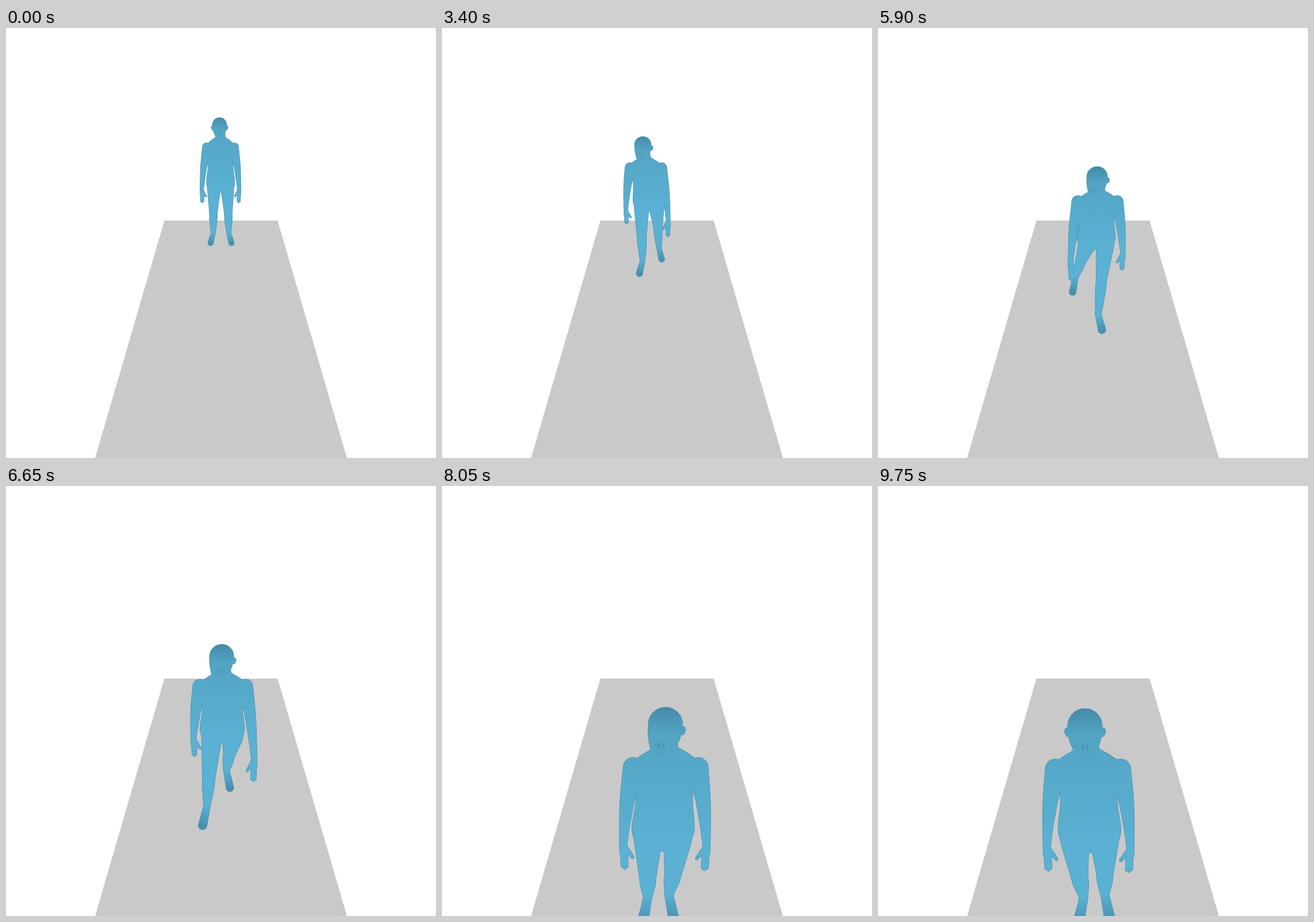
These frames come from a looping animation (748x748 px, 9.8 s). An HTML page with a canvas:

```html
<!DOCTYPE html>
<html lang="en">
<head>
<meta charset="utf-8">
<title>Walking figure</title>
<style>
  html, body { margin: 0; width: 100%; height: 100%; overflow: hidden; background: #fff; }
  svg, canvas { position: absolute; left: 0; top: 0; width: 748px; height: 748px; display: block; }
</style>
</head>
<body>
<svg viewBox="0 0 748 748"><polygon points="275.5,335 472.5,335 593,748 155,748" fill="#c9c9c9"/></svg>
<canvas id="stage" width="748" height="748"></canvas>
<script>
const ctx = document.getElementById('stage').getContext('2d');
const LOOP = 9800, STEP = 50;

// Camera: lengths in metres, pitched down 30 degrees.
const FOCAL = 648, EYE = 2.62, START = 4.58, TILT = Math.PI / 6;
const COS = Math.cos(TILT), SIN = Math.sin(TILT);

// x to the right, h above the floor, f walked towards the camera
function project([x, h, f], r = 0) {
  const d = START - f, z = d * COS + (EYE - h) * SIN, s = FOCAL / z;
  return [374 + x * s, 374 + ((EYE - h) * COS - d * SIN) * s, r * s];
}

const clamp = k => Math.min(1, Math.max(0, k));
const smooth = k => { k = clamp(k); return k * k * (3 - 2 * k); };
const mix = (a, b, k) => a + (b - a) * k;
const mixPt = (a, b, k) => a.map((v, i) => mix(v, b[i], k));
const add = (p, x, h, f) => [p[0] + x, p[1] + h, p[2] + f];

// Monotone curve through [time, value] knots.
function curve(...knots) {
  const slope = i => (knots[i + 1][1] - knots[i][1]) / (knots[i + 1][0] - knots[i][0]);
  const tangent = i => {
    if (i === 0 || i === knots.length - 1) return 0;
    const a = slope(i - 1), b = slope(i);
    return a * b > 0 ? 2 * a * b / (a + b) : 0;
  };
  return t => {
    if (t <= knots[0][0]) return knots[0][1];
    const i = knots.findIndex((k, n) => n < knots.length - 1 && t < knots[n + 1][0]);
    if (i < 0) return knots[knots.length - 1][1];
    const [t0, a] = knots[i], [t1, b] = knots[i + 1], h = t1 - t0, s = (t - t0) / h;
    return mix(a, b, smooth(s)) + h * s * (1 - s) * (tangent(i) * (1 - s) - tangent(i + 1) * s);
  };
}

// Pelvis travel, sideways sway, forward lean and head turn.
const travel = curve([2200, 0], [3000, 0.48], [5050, 1.04], [5900, 1.46], [7300, 2.55], [8150, 3.08]);
const sway = curve([0, -0.005], [2200, -0.05], [4300, -0.11], [6200, 0.04], [7200, -0.03], [8050, 0.035], [9100, -0.02]);
const lean = t => 0.38 * Math.sin(Math.PI * clamp((t - 2100) / 5600));
const turn = t => smooth((t - 1200) / 1000) * (1 - smooth((t - 8050) / 1050));

// Steps alternate, right of the stage first: [lift time, duration].
const steps = [[2450, 500], [3000, 600], [4250, 900], [5750, 1150], [6950, 500], [7500, 550]];

function footAt(side, t) {
  let f = 0, x = side * 0.11, swing = 0;
  steps.forEach(([lift, span], k) => {
    if ((k % 2 ? -1 : 1) !== side || t < lift) return;
    const p = clamp((t - lift) / span);
    f = mix(f, Math.min(0.42 + 0.65 * k, 3.04), smooth(p));
    x = mix(x, side * 0.1 + sway(lift + span), smooth(p));
    swing = Math.sin(Math.PI * p);
  });
  return { f, x, swing };
}

// Hips and everything above, tipped around the pelvis.
function upper(t, x, h, f = 0) {
  const a = lean(t), up = h - 0.85;
  return [x + sway(t) * (1 + 0.6 * up),
    0.85 + up * Math.cos(a) - f * Math.sin(a),
    travel(t) + up * Math.sin(a) + f * Math.cos(a)];
}

const spline = (a, b, c, d, k) => b + 0.5 * k * (c - a + k * (2 * a - 5 * b + 4 * c - d + k * (3 * (b - c) + d - a)));

// Calls fn with points on a smooth line through rows.
function along(rows, count, fn) {
  for (let i = 0; i < rows.length - 1; i++) {
    const b = rows[i], c = rows[i + 1], a = rows[i - 1] || b, d = rows[i + 2] || c;
    const n = count(b, c);
    for (let j = 0; j <= n; j++) fn(b.map((v, q) => spline(a[q], v, c[q], d[q], j / n)));
  }
}

function oval(path, x, y, rx, ry) {
  path.moveTo(x + rx, y);
  path.ellipse(x, y, rx, ry, 0, 0, 2 * Math.PI);
}

// Soft tube through [point, radius] pairs.
function tube(path, ...balls) {
  const rows = balls.map(([p, r]) => project(p, r));
  const count = (b, c) => Math.ceil(Math.hypot(c[0] - b[0], c[1] - b[1]) / 1.2) + 1;
  along(rows, count, ([x, y, r]) => oval(path, x, y, Math.max(r, 0.4), Math.max(r, 0.4)));
}

// Torso cross-sections: height, half width, half depth.
const slices = [[1.46, 0.06, 0.05], [1.405, 0.135, 0.07], [1.35, 0.175, 0.09], [1.24, 0.156, 0.1],
  [1.09, 0.158, 0.105], [0.89, 0.182, 0.11], [0.78, 0.165, 0.08]];

function torso(path, t) {
  along(slices, () => 30, ([h, w, depth]) => {
    const [x, y, s] = project(upper(t, 0, h), 1);
    const view = TILT + Math.atan((y - 374) / FOCAL);
    oval(path, x, y, w * s, depth * s * Math.sin(view));
  });
}

function leg(path, foot, side, t) {
  const { f, x, swing } = footAt(side, t);
  const heel = 0.3 * Math.max(0, travel(t) - f - 0.15);
  const hip = [sway(t) + side * 0.088, 0.8, travel(t)];
  const ankle = [x, 0.11 + heel + 0.06 * swing, f - 0.04 + heel / 2];
  const toe = [x + side * 0.035, 0.035 + 0.04 * swing, f + 0.1];

  // two-bone knee, bending forwards
  const thigh = 0.325, shin = 0.375, dh = ankle[1] - hip[1], df = ankle[2] - hip[2];
  const d = Math.hypot(dh, df);
  const reach = d < thigh + shin ? (thigh ** 2 - shin ** 2 + d * d) / (2 * d) : d * thigh / (thigh + shin);
  const bend = Math.sqrt(Math.max(0, thigh ** 2 - reach ** 2));
  const knee = [mix(hip[0], ankle[0], 0.5), hip[1] + (dh * reach + df * bend) / d, hip[2] + (df * reach - dh * bend) / d];

  tube(path, [hip, 0.084], [knee, 0.054], [mixPt(knee, ankle, 0.35), 0.05], [ankle, 0.029]);
  tube(foot, [ankle, 0.029], [toe, 0.037]);
  path.addPath(foot);
  return [project(ankle), project(toe)];
}

function arm(path, side, t) {
  const swing = 0.2 * (footAt(-side, t + 200).f - footAt(side, t + 200).f);
  const shoulder = upper(t, side * 0.17, 1.345);
  const elbow = add(shoulder, side * 0.043, -0.255, swing * 0.4);
  const wrist = add(shoulder, side * 0.07, -0.51, 0.05 + swing);
  const tip = add(wrist, -side * 0.002, -0.19, 0.04 + swing * 0.2);
  const palm = mixPt(wrist, tip, 0.4), thumb = mixPt(wrist, tip, 0.6);

  tube(path, [shoulder, 0.052], [elbow, 0.039], [wrist, 0.023], [palm, 0.025]);
  for (const k of [-1, 0, 1])
    tube(path, [add(palm, k * 0.011, 0, 0), 0.011], [add(tip, k * 0.014, k ? 0.015 : 0, 0), 0.007]);
  tube(path, [mixPt(wrist, tip, 0.15), 0.015], [add(thumb, -side * 0.05, 0, 0), 0.008]);
}

function fade(a, b, from, to) {
  const g = ctx.createLinearGradient(...a, ...b);
  g.addColorStop(0, from);
  g.addColorStop(1, to);
  return g;
}
const shade = k => `rgba(35,85,108,${k})`;

function draw(t) {
  const body = new Path2D(), face = new Path2D(), look = turn(t);
  const at = (x, h, f) => upper(t, x, h, f);
  const y = h => project(at(0, h))[1];

  torso(body, t);
  tube(body, [at(0, 1.42), 0.062], [at(0, 1.5), 0.055]);
  const feet = [-1, 1].map(side => {
    const foot = new Path2D();
    const ends = leg(body, foot, side, t);
    arm(body, side, t);
    return { foot, ends };
  });

  tube(face, [at(-0.01, 1.615), 0.083], [at(-0.01 - 0.005 * look, 1.575, 0.025), 0.078],
    [at(-0.01 - 0.018 * look, 1.52, 0.05), 0.055]);
  for (const x of [-0.095 + 0.035 * look, 0.075])
    tube(face, [at(x, 1.585), 0.015], [at(x, 1.565), 0.01]);
  body.addPath(face);

  ctx.clearRect(0, 0, 748, 748);
  ctx.lineWidth = 1.2;
  ctx.strokeStyle = '#3f87a3';
  ctx.stroke(body);
  ctx.fillStyle = fade([0, y(1.45)], [0, y(0.75)], '#55a7c7', '#5ab1d3');
  ctx.fill(body);

  ctx.globalCompositeOperation = 'source-atop';
  for (const { foot, ends } of feet) {
    ctx.fillStyle = fade(...ends.map(p => p.slice(0, 2)), shade(0), shade(0.36));
    ctx.fill(foot);
  }
  ctx.fillStyle = fade([0, y(1.7)], [0, y(1.56)], shade(0.32), shade(0.03));
  ctx.fill(face);

  ctx.lineCap = 'round';
  ctx.strokeStyle = shade(0.2);
  ctx.beginPath();
  for (const k of [-1, 1]) {
    const nose = h => project(at(-0.01 - 0.02 * look + k * 0.011, h, 0.08), 0.009);
    const [x0, y0, w] = nose(1.56), [x1, y1] = nose(1.535);
    ctx.lineWidth = w;
    ctx.moveTo(x0, y0);
    ctx.lineTo(x1, y1);
  }
  ctx.stroke();
  ctx.globalCompositeOperation = 'source-over';
}

const start = performance.now();
function tick() {
  const t = (performance.now() - start) % LOOP;
  draw(Math.floor(t / STEP) * STEP);
  requestAnimationFrame(tick);
}
tick();
</script>
</body>
</html>
```
